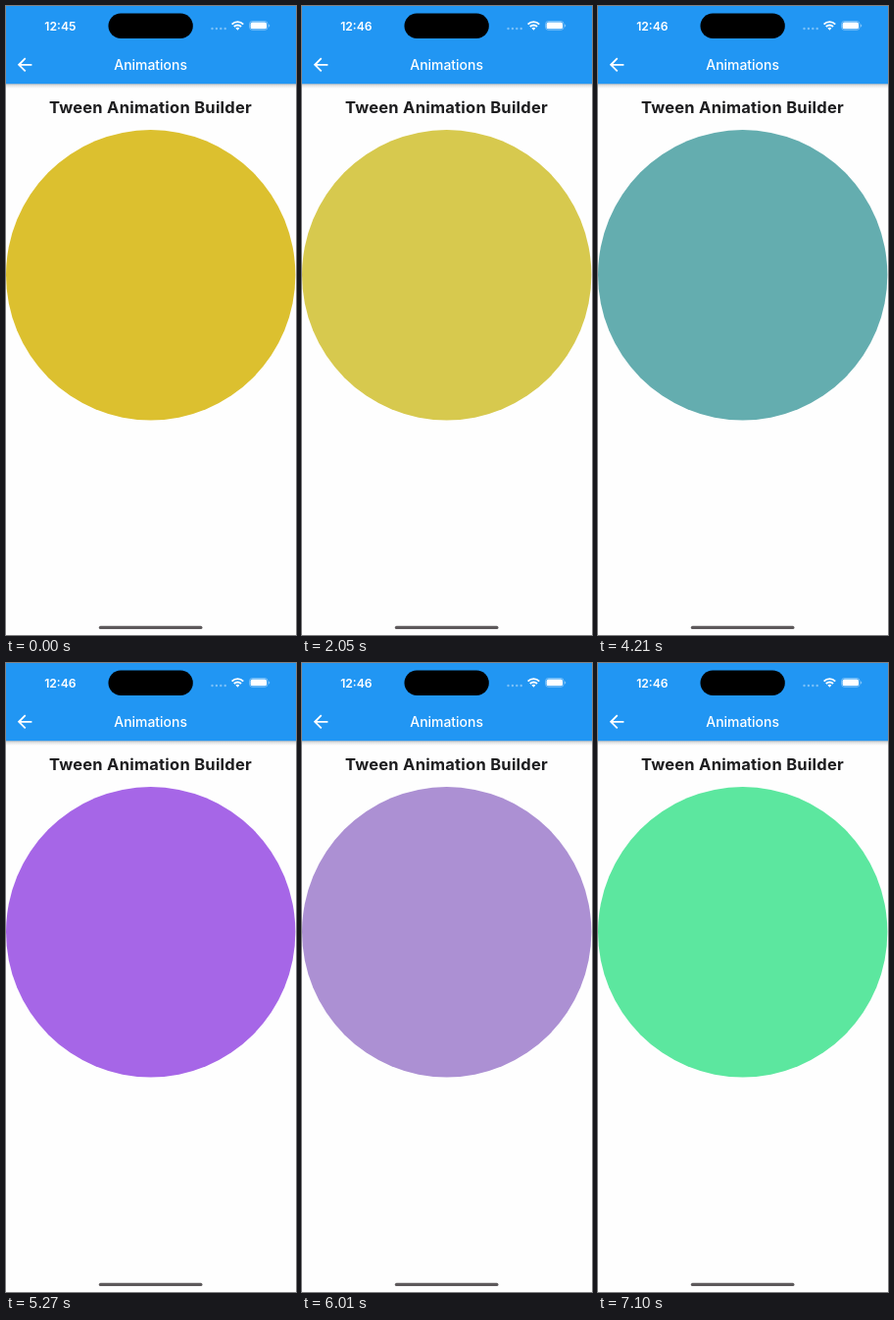
Animation of 296x640 px, one loop 7.13 s. Source, as an HTML page:

```html
<!DOCTYPE html>
<html lang="en">
<head>
<meta charset="utf-8">
<title>Tween Animation Builder</title>
<style>
  html, body { margin: 0; width: 100%; height: 100%; overflow: hidden; background: #fefefe; }
  svg { display: block; width: 296px; height: 640px; }
  text { font-family: Inter, Roboto, "Liberation Sans", sans-serif; text-anchor: middle; }
  .light { fill: #fff; }
</style>
</head>
<body>
<svg viewBox="0 0 296 640">
  <defs>
    <linearGradient id="shade" x2="0" y2="1">
      <stop offset="0" stop-color="#000" stop-opacity=".26"/>
      <stop offset=".4" stop-color="#000" stop-opacity=".1"/>
      <stop offset="1" stop-color="#000" stop-opacity="0"/>
    </linearGradient>
  </defs>
  <rect width="296" height="640" fill="#fefefe"/>
  <circle id="disc" cx="147.7" cy="273.8" r="147.7"/>

  <rect y="79" width="296" height="5" fill="url(#shade)"/>
  <rect width="296" height="79.2" fill="#2196f3"/>
  <rect x="104.5" y="7.6" width="86.3" height="25.3" rx="12.65"/>
  <text id="clock" class="light" x="55.4" y="24.5" font-size="12.2" font-weight="600">12:45</text>

  <line x1="210.5" x2="225" y1="23" y2="23" stroke="#fff" stroke-opacity=".4"
    stroke-width="2.4" stroke-linecap="round" stroke-dasharray="0 4.4"/>
  <g fill="none" stroke="#fff" stroke-width="1.9">
    <path d="M230.6 18.6a8.1 8.1 0 0 1 11.6 0"/>
    <path d="M232.8 21a5 5 0 0 1 7.2 0"/>
  </g>
  <path class="light" d="M236.4 24.7l-2-2.1a2.9 2.9 0 0 1 4 0z"/>
  <rect x="248.6" y="15.5" width="18.4" height="8.8" rx="2.8" fill="none" stroke="#fff" stroke-opacity=".45" stroke-width=".8"/>
  <rect class="light" x="249.6" y="16.5" width="16.4" height="6.8" rx="1.9"/>
  <path d="M268.2 18.4a1.6 1.6 0 0 1 0 3z" fill="#fff" fill-opacity=".5"/>

  <path class="light" transform="translate(8.2 48.9) scale(.91)"
    d="M20 11H7.83l5.59-5.59L12 4l-8 8 8 8 1.41-1.41L7.83 13H20z"/>
  <text class="light" x="147.6" y="64.6" font-size="13.95" font-weight="500">Animations</text>
  <text x="147.5" y="108.5" font-size="16.5" font-weight="700" letter-spacing=".26" fill="#1d1d1f">Tween Animation Builder</text>
  <rect x="94.8" y="630.7" width="105.7" height="3.4" rx="1.7" fill="#5d595b"/>
</svg>
<script>
  const LOOP = 7130;
  const STEP = LOOP / 66;   // time between repaints
  const TWEEN = 1000;       // time from one colour to the next
  const PHASE = 480;        // how far the first tween has run at the start
  const MINUTE = 650;

  const colours = "d3ba1f e6c640 f4cf58 b0c040 82b65a 4ea6eb d246e5 77f6bb 42d984"
    .split(" ")
    .map(hex => hex.match(/../g).map(pair => parseInt(pair, 16)));

  const disc = document.getElementById("disc");
  const clock = document.getElementById("clock");

  function colourAt(t) {
    const pos = (t + PHASE) / TWEEN;
    const i = Math.floor(pos);
    const rgb = colours[i].map((c, n) => Math.round(c + (colours[i + 1][n] - c) * (pos - i)));
    return `rgb(${rgb})`;
  }

  function draw(now) {
    const t = Math.floor(now % LOOP / STEP) * STEP;
    disc.setAttribute("fill", colourAt(t));
    clock.textContent = t < MINUTE ? "12:45" : "12:46";
  }

  const start = performance.now();
  function frame() {
    draw(performance.now() - start);
    requestAnimationFrame(frame);
  }
  frame();
</script>
</body>
</html>
```
